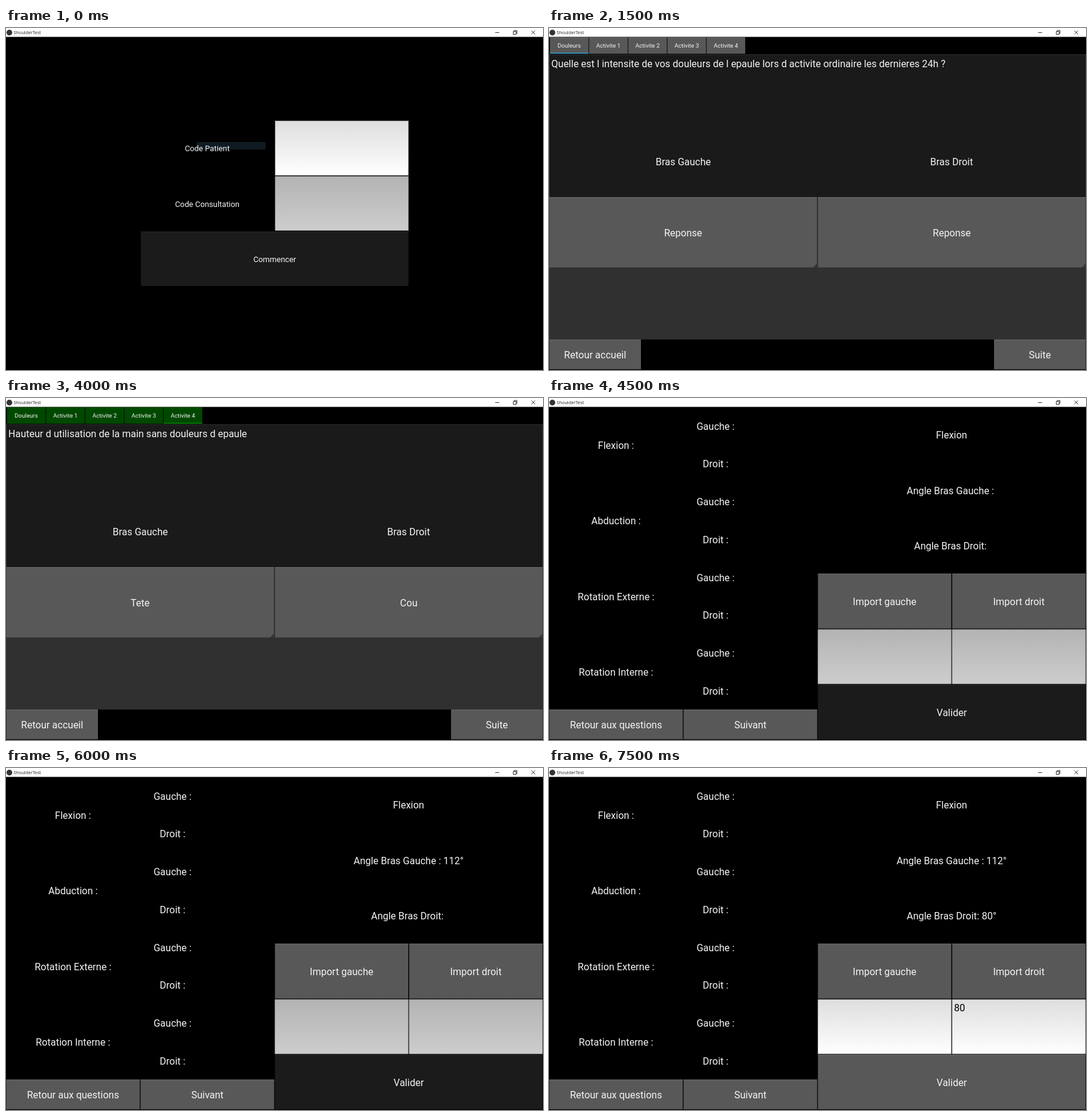
An HTML page for the animation above (8 s loop, 876 px wide and 558 px high).

```html
<!DOCTYPE html>
<html lang="fr">
<head>
<meta charset="utf-8">
<style>
html, body { margin: 0; width: 100%; height: 100%; overflow: hidden; background: #000; }
svg { display: block; width: 876px; height: 558px; font-family: Roboto, sans-serif; }
text { white-space: pre; }
</style>
</head>
<body>
<svg viewBox="0 0 876 558">
  <defs>
    <linearGradient id="on" x2="0" y2="1"><stop stop-color="#dedede"/><stop offset="1" stop-color="#fff"/></linearGradient>
    <linearGradient id="off" x2="0" y2="1"><stop stop-color="#b3b3b3"/><stop offset="1" stop-color="#cdcdcd"/></linearGradient>
    <clipPath id="list"><path d="M48 92H826V503H48z"/></clipPath>
  </defs>
  <g id="screen"></g>
  <rect width="876" height="14.5" fill="#fff"/>
  <circle cx="5.5" cy="7.5" r="4.7" fill="#333"/>
  <text x="12.5" y="10.3" font-size="7.3" fill="#222" font-family="Open Sans, sans-serif">ShoulderTest</text>
  <path d="M798 7.5h6.5M827.5 5.5h4.5v5h-4.5zM829 5.500v-1.500h4.500v5h-1.500M857.200 4.200l6 6m0-6l-6 6" fill="none" stroke="#222" stroke-width=".9"/>
</svg>
<script>
const STEP = 500, LOOP = 8000;
const GREY = '#585858', DARK = '#1b1b1b', BLUE = '#2f9fca';

const rect = (x, y, w, h, fill, extra = '') =>
  `<rect x="${x}" y="${y}" width="${w}" height="${h}" fill="${fill}" ${extra}/>`;

// y is the vertical middle of the capitals
const text = (s, x, y, size = 16, anchor = 'middle', fill = '#f4f4f4', extra = '') =>
  `<text x="${x}" y="${y + size * .355}" font-size="${size}" text-anchor="${anchor}" fill="${fill}" ${extra}>${s}</text>`;

const button = (s, x, y, w, h, size = 16, enabled = true) =>
  rect(x, y, w, h, enabled ? GREY : DARK) +
  rect(x, y, w, 1, enabled ? '#707070' : '#252525') +
  rect(x, y + h - 1, w, 1, enabled ? '#4b4b4b' : '#181818') +
  text(s, x + w / 2, y + h / 2 + .5, size);

const field = (s, x, y, w, h, enabled, size) =>
  rect(x, y, w, h, `url(#${enabled ? 'on' : 'off'})`, 'stroke="#777" stroke-width=".6"') +
  text(s, x + 3, y + size * .88, size, 'start', '#000');

function login({ patient = '', visit = '', ghost }) {
  return (ghost ? rect(311, 186, 112.5, 12.5, '#0f1a22') : '') +
    text('Code Patient', 328.3, 196.2, 12.8) +
    text('Code Consultation', 328.3, 287, 12.8) +
    field(patient, 439, 151.5, 217.5, 89, true, 12.8) +
    field(visit, 439, 242, 217.5, 88.5, patient, 12.8) +
    button('Commencer', 220, 332, 436.5, 89, 12.8, visit);
}

function spinner(s, x) {
  return button(s, x, 276, 436.5, 115) +
    `<path d="M${x + 436.500} 384.500v6.500h-6.500z" fill="#363636"/>`;
}

const PAINS = ['Aucune', 'Legere', 'Moyenne', 'Intolerable'];
const dropdown = x => PAINS.map((s, i) => button(s, x, 391 + i * 30.7, 436.5, 30.7, 9.6)).join('');

function questions({ title, left = 'Reponse', right = 'Reponse', tab = 0, done = 0, open, ready }) {
  const tabs = ['Douleurs', 'Activite 1', 'Activite 2', 'Activite 3', 'Activite 4'].map((s, i) => {
    const x = 1.5 + i * 63.9, green = i < done;
    return rect(x, 15.5, 63, 26.5, green ? '#004800' : GREY) +
      rect(x, 15.5, 63, 1, green ? '#005c00' : '#6c6c6c') +
      (i == tab ? rect(x, 40.5, 63, 1.5, green ? '#008c00' : BLUE) : '') +
      text(s, x + 31.5, 28.9, 9.6);
  }).join('');
  return tabs + rect(0, 43, 876, 465.5, '#303030') + rect(1, 44, 874, 232, '#1a1a1a') +
    text(title, 3.8, 58.5, 16, 'start') +
    text('Bras Gauche', 219, 218.5) + text('Bras Droit', 656.7, 218.5) +
    spinner(left, .5) + spinner(right, 438.8) +
    rect(0, 508.5, 876, 49.5, '#000') +
    button('Retour accueil', .5, 508.5, 149.5, 48.5) +
    button('Suite', 726, 508.5, 149.5, 48.5, 16, ready) +
    (open ? dropdown(open == 'left' ? .5 : 438.8) : '');
}

const SIZES = [110, 99, 117, 108, 108, 83, 83, 76, 79, 88, 113, 103, 128, 125, 114, 12,
  333, 313, 315, 292, 278, 322, 169, 189, 204, 335];
const series = (name, angles) => angles.flatMap(a => [1, 2, 3, 4, 5].map(n => `${name}_${a}_${n}.csv`));
const FILES = ['..\\', ...series('A_H', [120, 40, 90]), 'Angles summary.xlsx', ...series('F_G', [120, 90])];

function popup(selected) {
  const rows = FILES.map((name, i) => {
    const y = 100 + i * 15.35;
    return rect(51.5, y - 7.7, 773, 15.35, i == selected ? '#4b4b4b' : i % 2 ? '#313131' : '#272727') +
      text(name, 66.8, y, 9.6, 'start') +
      (i ? text(SIZES[i - 1] + ' KB', 818, y, 9.6, 'end') : '');
  }).join('');
  return rect(0, 14, 876, 544, '#000', 'opacity=".7"') +
    rect(47.5, 44.5, 779.5, 480, '#272727', 'rx="1.5" stroke="#1c1c1c"') +
    text('Charger Fichier', 56, 60.5, 8.96, 'start') +
    rect(51.5, 71, 773, 1.8, BLUE) +
    text('Name', 58, 86.8, 9.6, 'start', '#fff', 'font-weight="700"') +
    text('Size', 818, 86.8, 9.6, 'end', '#fff', 'font-weight="700"') +
    `<g clip-path="url(#list)">${rows}</g>` +
    rect(823, 93, 1.5, 195, '#4c4c4c') +
    button('Annuler', 52, 504, 385, 18.5, 9.6) + button('Charger', 438.5, 504, 385.5, 18.5, 9.6);
}

function angles({ left = '', right = '', typed = '', dialog, selected }) {
  const moves = ['Flexion', 'Abduction', 'Rotation Externe', 'Rotation Interne'].map((s, i) => {
    const y = 46 + i * 123.5;
    return text(s + ' :', 109.3, y + 31, 16) + text('Gauche :', 271.7, y) + text('Droit :', 271.7, y + 61.8);
  }).join('');
  return moves +
    button('Retour aux questions', .5, 508.5, 217.7, 48.5) + button('Suivant', 219.5, 508.5, 218, 48.5) +
    text('Flexion', 656.7, 60.5) +
    text('Angle Bras Gauche : ' + left, 656.7, 151) +
    text('Angle Bras Droit: ' + right, 656.7, 241.8) +
    button('Import gauche', 438.7, 286.7, 217.5, 89.5) + button('Import droit', 657.7, 286.7, 217.5, 89.5) +
    field('', 438.7, 377.7, 217.5, 88.8, right, 16) + field(typed, 657.7, 377.7, 217.5, 88.8, right, 16) +
    button('Valider', 438.7, 467.7, 436.5, 89.3, 16, right) +
    (dialog ? popup(selected) : '');
}

const pain = { title: 'Quelle est l intensite de vos douleurs de l epaule lors d activite ordinaire les dernieres 24h ?' };
const height = { title: 'Hauteur d utilisation de la main sans douleurs d epaule', left: 'Tete', right: 'Cou', tab: 4, done: 5, ready: true };

const states = [
  [login, { ghost: true }],
  [login, { patient: '1' }],
  [login, { patient: '1', visit: '1' }],
  [questions, pain],
  [questions, { ...pain, open: 'left' }],
  [questions, { ...pain, left: 'Legere' }],
  [questions, { ...pain, left: 'Legere', open: 'right' }],
  [questions, { ...pain, left: 'Legere', right: 'Moyenne', done: 1 }],
  [questions, height],
  [angles, {}],
  [angles, { dialog: true }],
  [angles, { dialog: true, selected: 5 }],
  [angles, { left: '112°' }],
  [angles, { left: '112°', dialog: true }],
  [angles, { left: '112°', right: '80°' }],
  [angles, { left: '112°', right: '80°', typed: '80' }],
];

const screenEl = document.getElementById('screen');
let shown = -1;
function draw() {
  const i = Math.floor(performance.now() % LOOP / STEP);
  if (i != shown) {
    const [view, options] = states[shown = i];
    screenEl.innerHTML = view(options);
  }
  requestAnimationFrame(draw);
}
draw();
</script>
</body>
</html>
```
